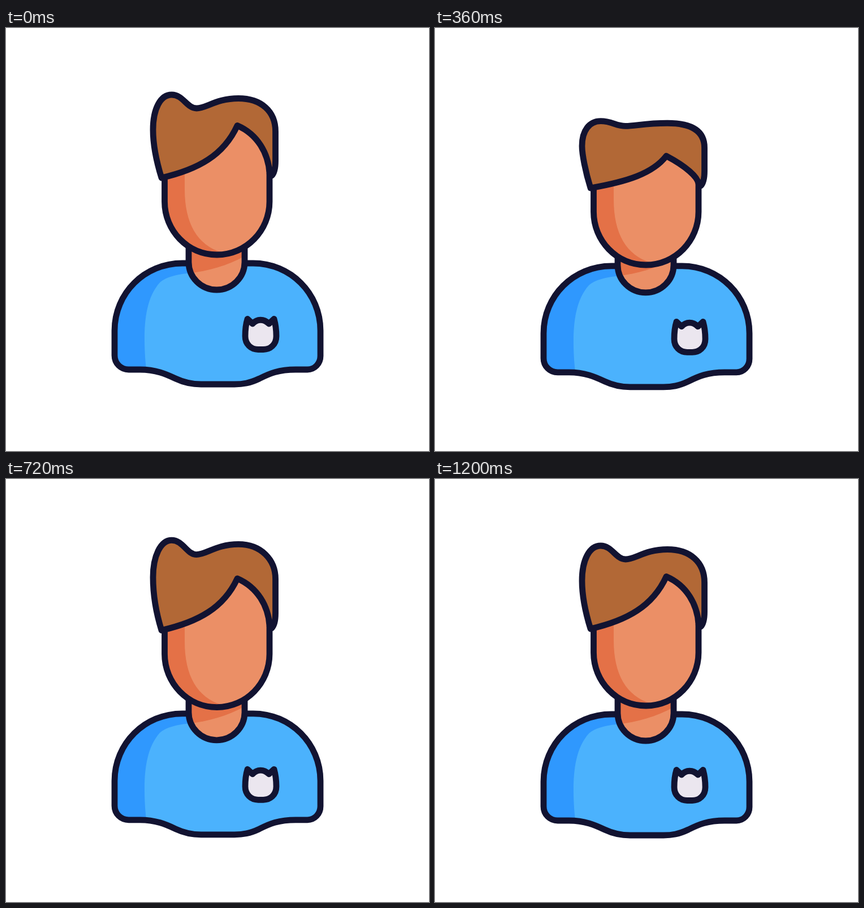
Animation of 748x748 px, one loop 3800 ms. Source, as an HTML page with a canvas:

```html
<!DOCTYPE html>
<html lang="en">
<head>
<meta charset="utf-8">
<title>Avatar</title>
<style>
  html, body { margin: 0; width: 100%; height: 100%; overflow: hidden; background: #fff; }
  canvas { display: block; width: 748px; height: 748px; }
</style>
</head>
<body>
<canvas id="stage" width="748" height="748"></canvas>
<script>
const ctx = document.getElementById('stage').getContext('2d');
const LOOP = 3800, STEP = 30;
const INK = '#121331', SKIN = '#eb8f66', SKIN_DARK = '#e47147', HAIR = '#b26836',
      SHIRT = '#4bb2fd', SHIRT_DARK = '#2f98fe', POCKET = '#ebe6ef';

// Keys are [time, value...]; values ease in and out between them.
const bodyKeys = [[0, 0], [165, 29], [475, -6], [840, 0.4], [1200, 0]];
const headKeys = [[0, 0], [203, 50], [525, -16.5], [765, 4.5], [900, 4.5], [1200, 0]];
// Hair: left crest, dip, right crest, parting.
const stretch = [-17.5, -14, -16, 0];
const hairKeys = [
  [0, 0, 0, 0, 0], [200, ...stretch], [348, 29, 13.5, 26, 36],
  [615, ...stretch], [965, 6.5, 0.3, 4, 4], [1200, 0, 0, 0, 0]
];

function sample(keys, t) {
  const i = keys.findIndex(k => k[0] > t);
  if (i < 0) return keys[keys.length - 1].slice(1);
  const a = keys[i - 1], b = keys[i];
  const p = (t - a[0]) / (b[0] - a[0]);
  const s = p * p * (3 - 2 * p);
  return a.slice(1).map((v, n) => v + (b[n + 1] - v) * s);
}

function fill(d, color) {
  ctx.fillStyle = color;
  ctx.fill(new Path2D(d));
}

function outline(d) {
  ctx.stroke(new Path2D(d));
}

// Fills a shape, lays a shade inside it, then draws its outline.
function shaded(shape, color, shade, shadeColor, edge = shape) {
  ctx.save();
  ctx.clip(new Path2D(shape));
  fill(shape, color);
  fill(shade, shadeColor);
  ctx.restore();
  outline(edge);
}

function at(y, draw) {
  ctx.save();
  ctx.translate(0, y);
  draw();
  ctx.restore();
}

const torso = `M323 416 H312 C245 416 192 469 192 535 V579 C192 593 203 604 217 604
  H237 C265 604 283 612 300 620 C317 628 330 630 345 630 H404
  C419 630 431 628 448 620 C466 611 482 604 512 604 H533
  C546 604 556 593 556 580 V535 C556 469 503 416 437 416 H422`;
const torsoShade = `M328 433 C300 436 284 440 272 450 C250 475 245 512 245 550
  C245 570 246 585 248 604 V640 H180 V400 H328 Z`;
const pocket = `M427 514.5 L436 523 C444 514 456 514 465 523 L474 514.5
  C477 525 478 535 478 545 C478 560 467 568.5 455 568.5 H446
  C433 568.5 423 559 423 545 C423 534 424 524 427 514.5 Z`;
const neckShade = 'M318 434 C355 431 393 420 424 402 V340 H318 Z';
const jaw = 'M280.5 264 V307 C280.5 358 321 401 373 401 C425 401 466 358 466 307 V257';
const faceShade = 'M316 240 V285 C316 345 338 384 382 397 V410 H270 V240 Z';

function drawBody(neckTop) {
  shaded(torso + 'Z', SHIRT, torsoShade, SHIRT_DARK, torso);
  fill(pocket, POCKET);
  outline(pocket);
  const neck = `M323 ${neckTop} V414 A49.5 49 0 0 0 422 414 V${neckTop}`;
  shaded(neck, SKIN, neckShade, SKIN_DARK);
}

function drawHead([left, dip, right, part]) {
  const side = dip * 0.8;
  const fringe = `C464 ${222 + part * 0.65} 445 ${188 + part * 1.1} 409 ${172.5 + part}
    C385 ${225 + part * 0.4} 340 ${250 + part * 0.1} 275 265 Z`;
  const hair = `M275 265 C266 236 260 205 260 ${180 + side}
    C260 ${143 + left * 0.7} 273 ${118 + left} 293 ${118 + left}
    C313 ${118 + left} 320 ${142 + dip} 337 ${142 + dip}
    C354 ${142 + dip} 372 ${124.5 + right} 411 ${124.5 + right}
    C451 ${124.5 + right} 476.5 ${147 + right * 0.6} 476.5 ${183 + side}
    V235 C476.5 247 474 257 470 261 L466 257 ${fringe}`;
  shaded(jaw + fringe, SKIN, faceShade, SKIN_DARK, jaw);
  fill(hair, HAIR);
  outline(hair);
}

function frame(now) {
  const t = Math.floor((now % LOOP) / STEP) * STEP;
  const [body] = sample(bodyKeys, t), [head] = sample(headKeys, t);
  ctx.fillStyle = '#fff';
  ctx.fillRect(0, 0, 748, 748);
  ctx.strokeStyle = INK;
  ctx.lineWidth = 10.8;
  ctx.lineJoin = 'round';
  at(body, () => drawBody(375 + head - body));
  at(head, () => drawHead(sample(hairKeys, t)));
}

const start = performance.now();
function loop() {
  frame(performance.now() - start);
  requestAnimationFrame(loop);
}
loop();
</script>
</body>
</html>
```
